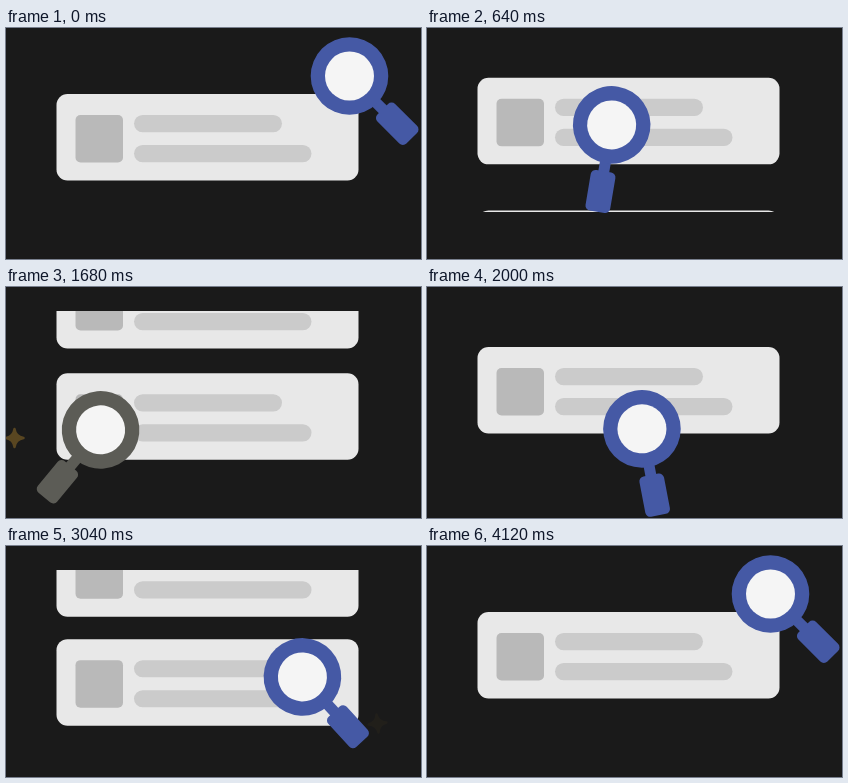
Recreate the animation shown at these times as an HTML page. Size 415 px wide and 231 px high, loop 4200 ms.

```html
<!DOCTYPE html>
<html lang="en">
<head>
<meta charset="utf-8">
<title>Searching a list</title>
<style>
  html, body { margin: 0; width: 100%; height: 100%; overflow: hidden; background: #1a1a1a; }
  svg { display: block; width: 100vw; height: 100vh; }
</style>
</head>
<body>
<svg viewBox="0 0 415 231">
  <defs>
    <clipPath id="window"><rect x="0" y="24" width="415" height="160"/></clipPath>
    <g id="card">
      <rect x="50.5" width="302" height="86.5" rx="11" fill="#e8e8e8"/>
      <rect x="69.5" y="21" width="47.5" height="47.5" rx="5" fill="#b9b9b9"/>
      <rect x="128" y="21" width="148" height="17.2" rx="8.6" fill="#cbcbcb"/>
      <rect x="128" y="51" width="177.5" height="17.2" rx="8.6" fill="#cbcbcb"/>
    </g>
    <path id="star" d="M0-9Q1.2-1.2 9 0Q1.2 1.2 0 9Q-1.2 1.2-9 0Q-1.2-1.2 0-9Z"
      fill="#f0b032" stroke="#f0b032" stroke-width="2.4" stroke-linejoin="round"/>
  </defs>
  <g clip-path="url(#window)">
    <use id="leaving" href="#card"/>
    <use id="arriving" href="#card"/>
  </g>
  <use class="spark" href="#star"/>
  <use class="spark" href="#star"/>
  <g id="glass">
    <rect x="34" y="-5.5" width="16" height="11"/>
    <rect x="47" y="-12.5" width="41" height="25" rx="5"/>
    <circle r="38.8"/>
    <circle r="24.5" fill="#f5f5f5"/>
  </g>
</svg>
<script>
  const LOOP = 4200, REST = 66, SCROLL = 900, LAG = 95;
  const scrolls = [25, 1305, 2636];
  const sparks = [
    { x: 8.5, y: 151, start: 920 },
    { x: 371.5, y: 177.5, start: 2040 }
  ];
  const corner = { x: 343.5, y: 48, turn: 45 };
  const left = { x: 84.5, y: 143.2, turn: 134 };
  const right = { x: 289, y: 144, turn: 48 };
  const legs = [
    { from: corner, to: left, start: 100, end: 1100, bow: -10 },
    { from: left, to: right, start: 1450, end: 2450, bow: -2 },
    { from: right, to: corner, start: 2600, end: 3960, bow: 0 }
  ];

  const find = id => document.getElementById(id);
  const leaving = find('leaving'), arriving = find('arriving'), glass = find('glass');
  const stars = document.querySelectorAll('.spark');

  const clamp = v => Math.min(1, Math.max(0, v));
  const mix = (a, b, p) => a + (b - a) * p;
  const ease = v => {
    const u = clamp(v);
    return u < 0.5 ? 4 * u ** 3 : 1 - 4 * (1 - u) ** 3;
  };
  const place = (el, x, y, more = '') =>
    el.setAttribute('transform', `translate(${x} ${y}) ${more}`);
  const latest = (list, t, key) => list.filter(v => key(v) <= t).pop() ?? list[0];

  function drawCards(t) {
    const start = latest(scrolls, t, v => v);
    place(arriving, 0, mix(-62.5, REST, ease((t - start) / SCROLL)));
    place(leaving, 0, mix(REST, 232, ease((t - start - LAG) / SCROLL)));
  }

  function drawGlass(t) {
    const { from, to, start, end, bow } = latest(legs, t, v => v.start);
    const p = ease((t - start) / (end - start));
    const y = mix(from.y, to.y, p) + bow * 4 * p * (1 - p);
    place(glass, mix(from.x, to.x, p), y, `rotate(${mix(from.turn, to.turn, p)})`);
    glass.setAttribute('fill', t >= 1600 && t < 1760 ? '#5c5c56' : '#4559a5');
  }

  function drawSparks(t) {
    sparks.forEach(({ x, y, start }, i) => {
      const age = t - start;
      const turn = 20 * (1 - age / 760);
      place(stars[i], x, y, `rotate(${turn}) scale(${clamp(age / 270)})`);
      stars[i].setAttribute('opacity', age > 0 ? clamp(1 - (age - 120) / 910) : 0);
    });
  }

  const begin = performance.now();
  function draw() {
    const t = (performance.now() - begin) % LOOP;
    drawCards(t);
    drawGlass(t);
    drawSparks(t);
    requestAnimationFrame(draw);
  }
  draw();
</script>
</body>
</html>
```
